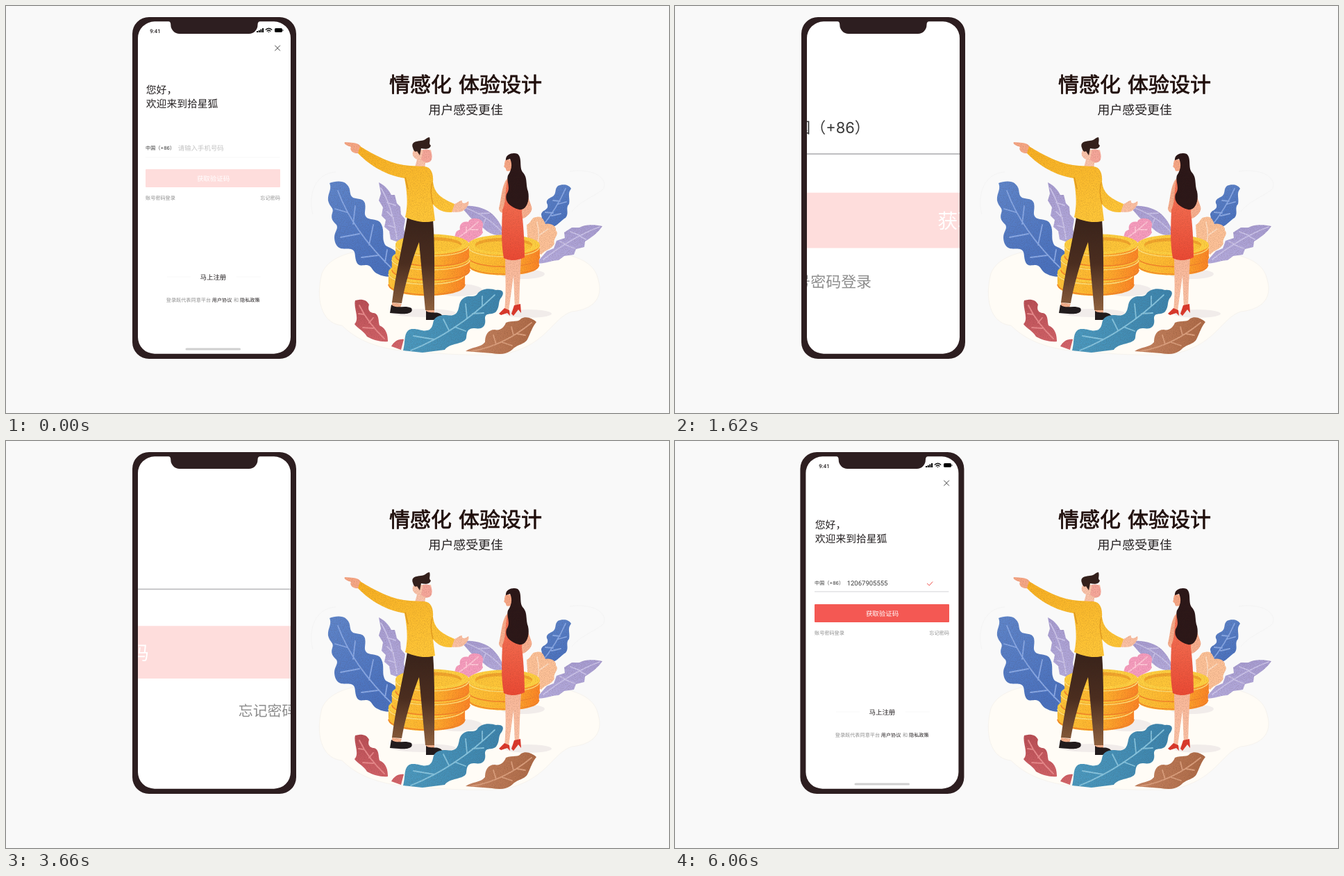
Write an HTML page that moves like this. It is 955 px wide and 586 px high and loops after 7.06 s.

```html
<!DOCTYPE html>
<html lang="zh-CN">
<head>
<meta charset="utf-8">
<title>登录体验</title>
<style>
  html, body { margin: 0; width: 100%; height: 100%; overflow: hidden; background: #f9f9f9; }
  svg { position: absolute; left: 0; top: 0; width: 100%; height: 100%; }
  text { font-family: Roboto, "Noto Sans CJK SC", "Noto Sans CJK", sans-serif; text-rendering: geometricPrecision; fill: #231f20; }
  .small { font-size: 7.15px; }
  .medium { font-size: 9.45px; }
  .muted { fill: #8d8d8d; }
  .code { font-family: Inter, "Noto Sans CJK SC", "Noto Sans CJK", sans-serif; fill: #3a3a3a; }
  .line { fill: none; stroke-linecap: round; stroke-linejoin: round; }
  .vein { fill: none; stroke-linecap: round; stroke-width: 1.8; }
  .title { font-size: 30px; fill: #200f0c; stroke: #200f0c; stroke-width: .8; }
</style>
</head>
<body>
<svg viewBox="0 0 955 586">
  <defs>
    <linearGradient id="blue" x2=".4" y2="1"><stop stop-color="#5f86cb"/><stop offset="1" stop-color="#4a72bf"/></linearGradient>
    <linearGradient id="teal" x2="1" y2="0"><stop stop-color="#4b9ac0"/><stop offset="1" stop-color="#3c84ad"/></linearGradient>
    <linearGradient id="brown" x2="1" y2="0"><stop stop-color="#c58461"/><stop offset="1" stop-color="#ad6a47"/></linearGradient>
    <linearGradient id="red" y2="1" x2="0"><stop stop-color="#b94f56"/><stop offset="1" stop-color="#d5656b"/></linearGradient>
    <linearGradient id="lilac" x2="0" y2="1"><stop stop-color="#a79dd2"/><stop offset="1" stop-color="#b4abdd"/></linearGradient>
    <linearGradient id="coin"><stop stop-color="#ffc438"/><stop offset=".5" stop-color="#ffb62e"/><stop offset="1" stop-color="#fd8526"/></linearGradient>
    <linearGradient id="sweater" x2=".4" y2="1"><stop stop-color="#f8b022"/><stop offset="1" stop-color="#ffc637"/></linearGradient>
    <linearGradient id="trousers" x2="0" y2="1"><stop stop-color="#38231b"/><stop offset=".5" stop-color="#4b2e20"/><stop offset="1" stop-color="#8f623f"/></linearGradient>
    <linearGradient id="skin" x2="0" y2="1"><stop stop-color="#f7a684"/><stop offset="1" stop-color="#fcc3a6"/></linearGradient>
    <linearGradient id="dress" x2="0" y2="1"><stop stop-color="#f6785a"/><stop offset="1" stop-color="#ec4a34"/></linearGradient>
    <filter id="grain" x="0" y="0" width="100%" height="100%" color-interpolation-filters="sRGB">
      <feTurbulence type="fractalNoise" baseFrequency=".8" numOctaves="2" seed="4"/>
      <feColorMatrix values="0 0 0 0 .3  0 0 0 0 .15  0 0 0 0 .1  0 0 0 .4 -.17"/>
      <feComposite in2="SourceGraphic" operator="in" result="speckle"/>
      <feMerge><feMergeNode in="SourceGraphic"/><feMergeNode in="speckle"/></feMerge>
    </filter>
    <g id="disc">
      <path d="M-54 0V20C-54 42 54 42 54 20V0Z" fill="url(#coin)"/>
      <path d="M-54 19C-50 40 50 40 54 19" fill="none" stroke="#f5862a" stroke-width="1.6"/>
      <path d="M-54 3C-50 24 50 24 54 3" fill="none" stroke="#ffe07a" stroke-width="1.6"/>
      <ellipse rx="54" ry="16" fill="#ffd041"/>
      <ellipse rx="43" ry="11.5" fill="#f2a62c"/>
      <path d="M-42 2C-34-9 34-9 42 2C34 15-34 15-42 2Z" fill="#fec638"/>
    </g>
  </defs>

  <text class="title" x="552" y="124">情感化</text>
  <text class="title" x="652" y="124">体验设计</text>
  <text x="608.5" y="156.2" font-size="17.9">用户感受更佳</text>

  <path d="M442 300C434 270 447 240 475 239M812 238C850 233 868 250 860 264C846 275 828 280 815 296" fill="none" stroke="#f4f4f4"/>
  <path d="M455 385C466 358 505 350 560 347L750 350C820 355 847 367 853 394C861 421 845 437 815 440C787 449 780 486 723 500C680 506 600 499 560 495C530 490 504 480 484 460C453 457 446 420 455 385Z" fill="#fffcf6" stroke="#f6f3ee"/>
  <g fill="#f1ecea">
    <ellipse cx="602" cy="442" rx="46" ry="6"/><ellipse cx="752" cy="443" rx="34" ry="6"/>
    <ellipse cx="652" cy="409" rx="34" ry="9"/><ellipse cx="744" cy="386" rx="32" ry="7"/>
  </g>

  <g filter="url(#grain)">
    <path d="M466 255C474 252 486 251 491 257C498 263 493 272 500 276C508 279 514 276 517 284C519 294 514 300 520 305C528 309 538 306 541 315C546 326 540 335 547 345C556 350 561 350 563 358L564 388C556 390 545 391 536 386C527 383 528 374 520 373C512 373 507 376 504 366C502 358 504 352 497 350C487 349 478 352 474 340C470 326 480 322 476 315C472 311 467 307 470 298C473 290 466 290 464 280C463 270 470 264 466 255Z" fill="url(#blue)"/>
    <path class="vein" stroke="#89a9e6" d="M478 266C494 310 526 350 561 383M491 297L474 292M500 314L503 288M509 328L482 333M523 344L529 315M536 359L512 362M546 369L549 351"/>
    <path d="M537 254C547 259 552 266 555 272L560 272L563 284L568 289L569 300L575 307L573 320L575 330L570 342L554 336L552 324L545 318L547 308L541 302L543 290L537 280L540 270Z" fill="url(#lilac)"/>
    <path class="vein" stroke="#cbc4eb" d="M540 262Q557 290 563 335M549 283L561 287M549 296L558 305M551 316L561 319"/>
    <path d="M654 289C672 285 691 291 701 300C710 309 715 318 718 330C700 333 688 322 680 311C670 310 665 297 654 289Z" fill="url(#lilac)"/>
    <path class="vein" stroke="#c8c1e8" d="M660 290Q694 302 715 326M681 299L696 298M691 306L687 316"/>
    <path d="M645 337C648 329 646 324 654 322C652 314 659 309 666 311C668 304 680 305 685 309C690 315 684 321 687 326C683 334 674 334 668 340Z" fill="#f79dbf"/>
    <path class="vein" stroke="#ffc3d6" d="M648 336Q663 326 680 311M663 326L663 318M669 322L680 322"/>
    <path d="M795 259C802 256 811 257 814 263C808 270 813 277 811 285C805 291 812 298 806 305C800 308 796 315 788 318C782 324 774 324 764 319C768 309 774 309 771 301C771 293 782 295 780 286C776 278 784 277 789 273C793 268 790 264 795 259Z" fill="url(#blue)"/>
    <path class="vein" stroke="#89a9e6" d="M806 263Q793 292 771 319M798 281L788 280M796 285L807 282M788 298L777 297M786 302L799 299"/>
    <path d="M750 315C757 312 756 304 764 304C772 302 774 307 777 314C785 312 793 317 792 323C798 329 787 335 790 342C785 352 777 350 771 358L752 345Z" fill="#fdc298"/>
    <path class="vein" stroke="#ffdcc0" d="M765 311Q770 331 764 350M768 330L781 321"/>
    <path d="M859 317C846 314 832 315 826 319L815 319L804 326L805 334L793 338L789 349L779 353L763 371C778 371 787 366 796 366L804 360L818 358L821 350L833 347L834 339C844 333 853 326 859 317Z" fill="url(#lilac)"/>
    <path class="vein" stroke="#cbc4eb" d="M855 318Q815 333 774 365M826 330L813 325M826 331L835 336M806 343L798 339M806 344L819 349"/>

    <use href="#disc" transform="translate(717 357) scale(.94 .84)"/>
    <use href="#disc" transform="translate(717 344) scale(.96 .9)"/>
    <use href="#disc" transform="translate(606 383) scale(1.02 .94)"/>
    <use href="#disc" transform="translate(612 363) scale(1.04 .9)"/>
    <use href="#disc" transform="translate(614 343) scale(.98 .9)"/>

    <!-- man -->
    <path d="M511 202C506 196 498 197 488 196C486 199 491 201 497 203C494 208 501 213 508 212ZM642 286C650 285 652 280 657 280C656 284 660 286 666 281C668 284 664 291 658 295C651 298 646 296 640 297Z" fill="url(#skin)"/>
    <path d="M588 207H612C615 219 612 226 604 226L603 236H588L592 221C585 218 584 211 588 207Z" fill="#fbc4ab"/>
    <path d="M601 207C612 204 615 213 613 221C611 227 602 226 598 221Z" fill="#f6a79a"/>
    <path d="M586 204C583 195 592 195 597 194C604 194 606 189 610 189C612 195 608 198 612 201C610 207 603 206 598 205L596 215L592 209C589 211 587 208 586 204Z" fill="#33201c"/>
    <path d="M578 304L615 307C618 345 617 395 617 438H604L595 340C586 362 575 400 570 428L556 427C561 386 572 342 578 304Z" fill="url(#trousers)"/>
    <path d="M510 202C533 216 558 229 582 230L603 231C612 232 616 241 615 253C617 269 625 276 646 285L642 297C628 298 619 291 615 285L618 309C604 314 585 309 575 304C580 283 577 264 574 248C548 244 524 230 507 212Z" fill="url(#sweater)"/>
    <path class="line" stroke="#e39a1e" stroke-width="1.3" d="M575 247L579 263M614 254Q610 269 615 285"/>
    <path d="M556 427L570 429L568 434H556ZM605 438H617V443H605Z" fill="#f5b18d"/>
    <path d="M555 430C563 437 574 430 584 435C588 443 575 444 566 443L553 442ZM605 439C612 444 622 438 629 446C629 451 620 450 616 452L605 452Z" fill="#201b1d"/>

    <!-- woman -->
    <path d="M720 221C717 225 719 229 717 231L720 234C720 239 724 238 728 237L724 247C714 254 714 276 710 291C710 296 714 299 718 297L745 306C753 302 759 295 757 289L750 269L740 240L736 222ZM719 361H742L740 402L739 435H733L731 388L724 439H718C721 408 719 386 719 361Z" fill="url(#skin)"/>
    <path d="M722 251C718 270 721 280 715 294C714 318 713 342 717 363C726 368 739 366 747 362C747 339 745 312 743 297L745 268Z" fill="url(#dress)"/>
    <path d="M720 222C719 213 731 210 737 213C744 219 739 232 744 239C752 247 748 257 752 267C755 281 749 295 739 293C725 289 718 281 721 271C728 261 720 253 723 244C728 237 730 228 726 220Z" fill="#2b1718"/>
    <path d="M718 435L725 438L726 446L722 442L713 445L710 443ZM732 431L741 429L742 442L738 437L731 446L728 443Z" fill="#dc392c"/>

    <path d="M503 424C512 421 520 423 523 430C520 438 525 442 530 442C538 444 536 454 538 460C548 464 550 474 550 483C540 484 529 481 520 476C516 468 506 464 502 458C510 450 500 434 503 424ZM555 490C559 483 565 479 573 480L569 495Z" fill="url(#red)"/>
    <path class="vein" stroke="#e98a8c" d="M509 431Q521 456 545 479M515 444L508 443M523 456L529 449M529 464L514 463"/>
    <path d="M572 496C576 482 572 468 584 465C596 464 600 470 610 466C618 460 612 452 622 447C634 442 640 449 648 443C655 436 650 426 660 420C668 415 675 422 680 413C688 405 700 407 706 409C716 408 718 413 714 419C708 425 712 432 706 440C700 446 690 440 690 450C692 462 685 466 675 464C664 464 664 470 663 478C660 488 640 484 632 495L600 499Z" fill="url(#teal)"/>
    <path class="vein" stroke="#85c4df" d="M583 496Q648 470 704 416M617 480L587 475M638 467L630 451M646 462L662 468M664 449L662 429M672 443L688 442M686 432L686 418"/>
    <path d="M662 497C672 490 684 492 690 484C690 474 694 466 704 466C712 468 718 462 720 456C730 452 738 456 742 450C750 446 758 450 764 455C758 462 756 470 752 478C748 488 738 486 730 494C722 502 710 502 700 500Z" fill="url(#brown)"/>
    <path class="vein" stroke="#db9f7d" d="M671 497Q717 489 757 456M706 487L702 474M714 484L729 489M731 474L728 462M736 472L748 474"/>
  </g>
</svg>

<svg viewBox="0 0 955 586">
  <clipPath id="window"><rect x="186" y="20" width="228" height="484" rx="24"/></clipPath>
  <rect id="glass" x="186" y="20" width="228" height="484" rx="24" fill="#fff"/>
  <g clip-path="url(#window)">
    <g id="page">
      <text x="207.3" y="38.8" font-size="7.8" font-weight="500">9:41</text>
      <path d="M361 36h2v2h-2ZM363.7 35h2v3h-2ZM366.4 33.5h2v4.5h-2ZM369.1 32h2v6h-2Z"/>
      <path class="line" stroke="#111" stroke-width="1.4" d="M374.3 34Q378.5 30.3 382.7 34M376.2 36Q378.5 34 380.8 36M378.4 37.6h.2"/>
      <rect x="387" y="32" width="11" height="5.8" rx="1.6"/><path d="M398.6 34v2h.8v-2Z"/>
      <path class="line" stroke="#444" d="M387.6 57L394.6 64.2M394.6 57L387.6 64.2"/>
      <text x="201.8" y="125.6" font-size="14.8">您好，</text>
      <text x="201.8" y="146" font-size="14.8">欢迎来到拾星狐</text>
      <text class="small code" x="201" y="207.1">中国（+86）</text>
      <text class="medium" id="hint" x="247.7" y="208" style="fill:#c3c3c3">请输入手机号码</text>
      <text id="phone" x="247.7" y="208.2" font-size="9.5" style="fill:#3a3a3a"></text>
      <path id="idleLine" d="M201 218H394.5" stroke="#f3f3f3" stroke-width=".6"/>
      <path id="activeLine" d="M201 216.9H394.3" stroke="#bfbfc1" stroke-width=".65"/>
      <path id="tick" class="line" stroke="#f0524d" d="M363.4 205.3L366.3 208L370.9 202.9" pathLength="100" stroke-dasharray="100 200"/>
      <rect id="button" x="201" y="235" width="194" height="26" rx="1"/>
      <text class="medium" x="274.9" y="251.6" style="fill:#fff">获取验证码</text>
      <text class="small muted" x="201" y="279.3">账号密码登录</text>
      <text class="small muted" x="366.3" y="279.3">忘记密码</text>
      <path d="M232 390H266M332 390H367" stroke="#f5f5f5" stroke-width=".6"/>
      <text class="medium" x="279.5" y="393.6">马上注册</text>
      <text class="small muted" x="230.8" y="426.1">登录既代表同意平台</text>
      <text class="small" x="296.8" y="426.1">用户协议</text>
      <text class="small muted" x="328" y="426.1">和</text>
      <text class="small" x="337" y="426.1">隐私政策</text>
      <rect x="258.5" y="492.6" width="79.5" height="3" rx="1.5" fill="#cfcfcf"/>
    </g>
  </g>
  <path id="frame" fill="#2d1e20" fill-rule="evenodd" d="M206 16H394A24 24 0 0 1 418 40V484A24 24 0 0 1 394 508H206A24 24 0 0 1 182 484V40A24 24 0 0 1 206 16ZM214 22.3A24 24 0 0 0 190 46.3V476.7A24 24 0 0 0 214 500.7H386A24 24 0 0 0 410 476.7V46.3A24 24 0 0 0 386 22.3H366Q362.5 22.3 362.5 27A12.5 13 0 0 1 350 40H250A12.7 13 0 0 1 237.3 27Q237.3 22.3 234 22.3Z"/>
</svg>

<script>
const LOOP = 7060, STEP = 40;
const PHONE = '12067905555';
const el = id => document.getElementById(id);
const progress = (t, from, to) => Math.min(1, Math.max(0, (t - from) / (to - from)));

// Monotone cubic interpolation through [time, value] keys.
function track(keys) {
  const rise = i => (keys[i + 1][1] - keys[i][1]) / (keys[i + 1][0] - keys[i][0]);
  const slope = i => {
    if (i === 0 || i === keys.length - 1) return 0;
    const a = rise(i - 1), b = rise(i);
    return a * b > 0 ? 2 * a * b / (a + b) : 0;
  };
  return t => {
    if (t <= keys[0][0]) return keys[0][1];
    const i = keys.findIndex((key, k) => k < keys.length - 1 && t < keys[k + 1][0]);
    if (i < 0) return keys[keys.length - 1][1];
    const [t0, v0] = keys[i], [t1, v1] = keys[i + 1];
    const span = t1 - t0, u = (t - t0) / span, w = 1 - u;
    return v0 * w * w * (1 + 2 * u) + v1 * u * u * (3 - 2 * u)
      + span * u * w * (slope(i) * w - slope(i + 1) * u);
  };
}

const zoom = track([[100, 1], [820, 2.92], [1040, 3.34], [1240, 3.34], [1620, 3.07],
  [2240, 2.92], [5700, 2.92], [6060, 1]]);
const pan = track([[1200, 0], [1620, -33], [2740, -161], [3660, -333.5], [4300, -352],
  [5700, -352], [6060, 0]]);

function draw(t) {
  const scale = zoom(t);
  const x = pan(t) - 209 * (scale - 1), y = -218.75 * (scale - 1);
  el('page').setAttribute('transform', `translate(${x} ${y}) scale(${scale})`);

  el('hint').style.opacity = t < 1240 ? 1 : 0;
  const focus = progress(t, 1040, 1400);
  el('idleLine').style.opacity = 1 - focus;
  el('activeLine').style.opacity = focus;
  el('phone').textContent = PHONE.slice(0, Math.max(0, Math.floor((t - 1660) / 95) + 1));

  const drawn = 43 * progress(t, 5020, 5140) + 57 * progress(t, 5140, 5260);
  el('tick').style.strokeDashoffset = 100 - drawn;
  el('tick').style.opacity = drawn > 0 ? 1 : 0;

  const active = progress(t, 5380, 5540);
  const mix = (a, b) => Math.round(a + (b - a) * active);
  el('button').style.fill = `rgb(${mix(254, 244)},${mix(221, 88)},${mix(220, 83)})`;

  const shift = `translate(${t >= 6060 ? -1.6 : 0} 0)`;
  el('frame').setAttribute('transform', shift);
  el('glass').setAttribute('transform', shift);
}

function tick(now) {
  const t = now % LOOP;
  draw(Math.floor((t + 20) / STEP) * STEP - 20);
  requestAnimationFrame(tick);
}
draw(0);
requestAnimationFrame(tick);
</script>
</body>
</html>
```
